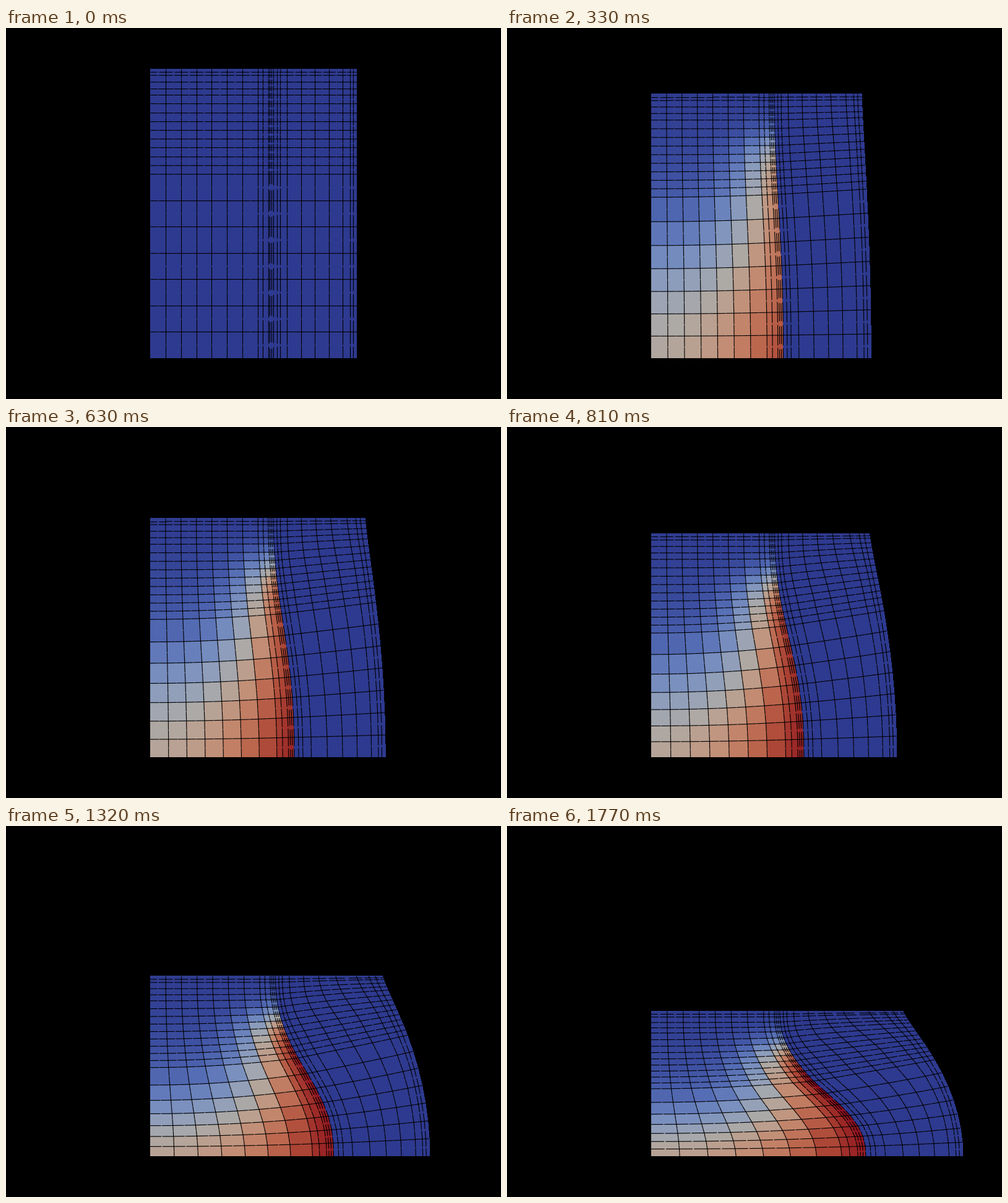
These frames come from a looping animation (800x600 px, 1.8 s). A matplotlib script:

```python
import numpy as np
import matplotlib
import matplotlib.pyplot as plt
from matplotlib.animation import FuncAnimation
from matplotlib.collections import LineCollection, PolyCollection

FRAMES, INTERVAL = 60, 30
LEFT, MID, RIGHT = 233.0, 431.9, 567.0
BOTTOM, HEIGHT, DROP = 534.0, 468.4, 234.0
KNEE = 7 / 11  # height where the rows become finer

# Mesh lines as fractions: inner block, outer block, height
xi = np.array([*range(8), 7 + 1 / 3, 7 + 2 / 3, 7 + 7 / 9, 7 + 8 / 9, 8]) / 8
fr = np.array([.25, .5, 1, 2, 3, 4, 5, 5.5, 5.75, 6]) / 6
eta = np.array([*range(7), *(7 + np.arange(9) / 3),
                10, 10.25, 10.5, 10.75, 10.875, 11])[:, None] / 11

# Top displacement in pixels against load step
STEPS = [0, 7, 15, 17, 25, 32, 33, 41, 50, 54]
DROPS = [0, 27, 64, 73.5, 106.5, 140, 143.7, 177, 214.7, 234]


def load(frame):
    """Load from 0 to 1; every twelfth frame repeats the one before."""
    step = frame - (frame + 3) // 12
    return np.interp(step, STEPS, DROPS) / DROP


def sink(knee, bend, q):
    """Share of the top displacement taken over the height."""
    m = eta / KNEE
    n = np.clip((eta - KNEE) / (1 - KNEE), 0, 1)
    low = knee * ((1 + bend) * m - bend * m ** 3)
    high = knee + (1 - knee) * (1 - (1 - n) ** q)
    return np.where(eta <= KNEE, low, high)


def deform(T):
    # sideways motion of the interface and the free edge
    top = 9 * T ** 3.5
    u_mid = top + (70 * T + 78 * T ** 2 - top) * (1 - eta ** 2.5) ** 2.4
    foot = 112 * T + 58 * T ** 2
    head = 34 * T + 39 * T ** 3.2
    u_out = head + (foot - head) * (1 - eta ** 2) ** 1.25

    # downward motion of the axis, the interface and the free edge
    q = 2.5 - 1.2 * T
    lag = (.2 * T * (1 - T) + .03 * T) * np.sin(np.pi * eta ** 1.2)
    y0 = BOTTOM - HEIGHT * eta
    y_axis = y0 + DROP * T * sink(.925 - .117 * T ** 3, .28 - .13 * T ** 3, q)
    y_mid = y0 + DROP * T * sink(.81 - .055 * T ** 3, .15 - .1 * T, q)
    y_out = y0 + DROP * T * (eta - lag)

    k = .15 - .3 * eta
    x_in = LEFT + (MID - LEFT) * xi + u_mid * ((1 + k) * xi - k * xi ** 3)
    y_in = y_axis + (y_mid - y_axis) * xi ** 2

    a = np.maximum(1, 3 - 2 * eta / .7)
    b = 1 + 3 * np.clip((eta - .7) / .3, 0, 1) ** 2
    g = np.where(eta < .7, 1 - (1 - fr) ** a, fr ** b)
    x_ex = MID + (RIGHT - MID) * fr + u_mid + (u_out - u_mid) * g
    y_ex = y_mid + (y_out - y_mid) * fr
    return np.stack([np.hstack([x_in, x_ex]), np.hstack([y_in, y_ex])], -1)


def shades(T):
    """Cell colours: a graded inner block, a plain outer block."""
    h = (eta[1:] + eta[:-1]) / 2
    c = (xi[1:] + xi[:-1]) / 2
    rise = 1 - .9 * np.exp(-T / .045) - .1 * np.exp(-T / .3)
    axis = .56 * rise * np.exp(-4 * h ** 2)
    slope = .08 - .68 * np.exp(-T / .3)
    edge = .97 * (1 - np.exp(-T / .075)) * (1 + slope * h)
    edge = edge / (1 + np.exp((h - .835) / .04))
    blend = 1 - (1 - c ** (2 + 4.6 * h ** 2)) ** 1.5
    val = np.zeros((len(h), len(xi) + len(fr) - 1))
    val[:, :len(c)] = axis + (edge - axis) * blend
    rgb = matplotlib.colormaps["coolwarm"](np.clip(val, 0, 1).ravel())[:, :3]
    return rgb * [.785, .765, .745]


def broken(P):
    """Inner lines along the second axis, each edge open at its middle."""
    a, b = P[1:-1, :-1], P[1:-1, 1:]
    mids = (P[:, 1:] + P[:, :-1]) / 2
    thick = np.linalg.norm(mids[2:] - mids[:-2], axis=-1) / 2
    gap = np.minimum(.65 / np.maximum(thick, .5), .5)
    s = ((1 - gap) / 2)[..., None]
    halves = [np.stack([a, a + (b - a) * s], -2),
              np.stack([b - (b - a) * s, b], -2)]
    return np.concatenate([v.reshape(-1, 2, 2) for v in halves])


fig = plt.figure(figsize=(8, 6), dpi=100, facecolor="black")
ax = fig.add_axes([0, 0, 1, 1])
ax.set(xlim=(0, 800), ylim=(600, 0))
ax.axis("off")
cells = ax.add_collection(PolyCollection([], edgecolors="none", antialiased=False))
lines = ax.add_collection(LineCollection([], colors="black", linewidths=.8,
                                         capstyle="butt"))


def draw(frame):
    T = load(frame)
    P = deform(T)
    quads = np.stack([P[:-1, :-1], P[:-1, 1:], P[1:, 1:], P[1:, :-1]], 2)
    cells.set_verts(quads.reshape(-1, 4, 2))
    cells.set_facecolor(shades(T))
    lines.set_segments(np.concatenate([broken(P), broken(P.swapaxes(0, 1))]))
    return cells, lines


anim = FuncAnimation(fig, draw, frames=FRAMES, interval=INTERVAL,
                     repeat=True, repeat_delay=0)
plt.show()
```
